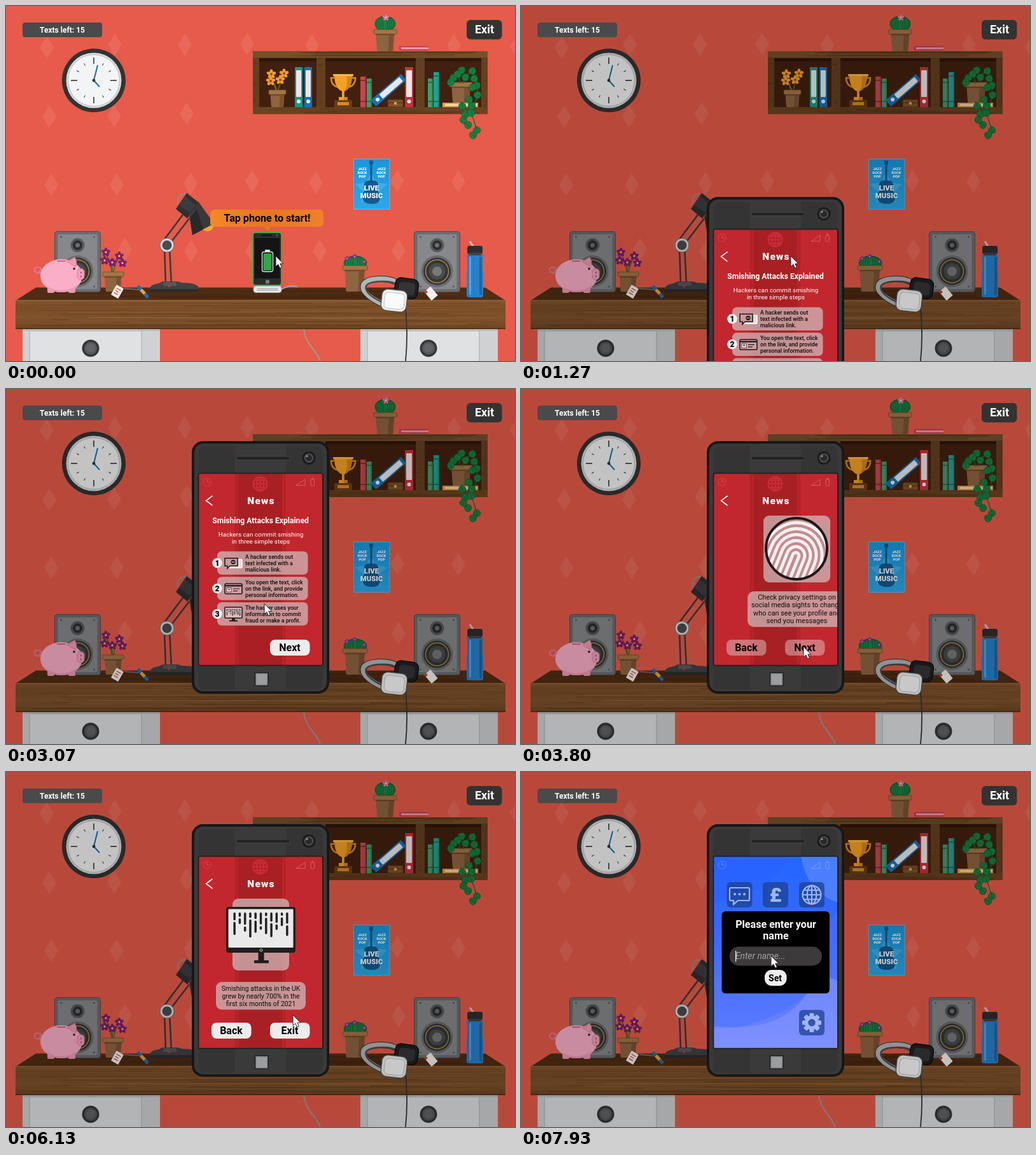
These frames come from a looping animation (800 by 558 pixels, 8000 ms). An HTML page:

```html
<!DOCTYPE html>
<html lang="en">
<head>
<meta charset="utf-8">
<title>Smishing game</title>
<style>
html, body { margin: 0; width: 100%; height: 100%; overflow: hidden; background: #e65b49; }
svg { display: block; width: 100vw; height: 100vh; }
text { font-family: Roboto, Arial, sans-serif; }
</style>
</head>
<body>
<svg id="stage" viewBox="0 0 800 558" preserveAspectRatio="none"></svg>
<script>
const rect = (x, y, w, h, fill, rx = 0, more = '') =>
  `<rect x="${x}" y="${y}" width="${w}" height="${h}" rx="${rx}" fill="${fill}" ${more}/>`;
const circ = (x, y, r, fill, more = '') => `<circle cx="${x}" cy="${y}" r="${r}" fill="${fill}" ${more}/>`;
const oval = (x, y, a, b, fill, more = '') =>
  `<ellipse cx="${x}" cy="${y}" rx="${a}" ry="${b}" fill="${fill}" ${more}/>`;
const path = (d, fill, more = '') => `<path d="${d}" fill="${fill}" ${more}/>`;
const line = (d, color, w = 1, more = '') =>
  `<path d="${d}" fill="none" stroke="${color}" stroke-width="${w}" ${more}/>`;
const group = (more, ...parts) => `<g ${more}>${parts.join('')}</g>`;
const edge = (c, w = 1) => `stroke="${c}" stroke-width="${w}"`;
const text = (x, y, size, str, fill = '#000', weight = 700, anchor = 'middle', more = '') =>
  `<text x="${x}" y="${y}" font-size="${size}" font-weight="${weight}" fill="${fill}" text-anchor="${anchor}" ${more}>${str}</text>`;
const lines = (x, y, step, size, rows, ...rest) =>
  rows.map((s, i) => text(x, y + i * step, size, s, ...rest)).join('');
const each = (list, f) => list.map(f).join('');
const times = (n, f) => each([...Array(n).keys()], f);

let seed = 7;
const rnd = () => (seed = seed * 16807 % 2147483647) / 2147483647;

function grain(x, y, w, h, n, color) {
  return times(n, () => {
    const len = w * (0.2 + rnd() * 0.6), px = x + rnd() * (w - len), py = y + rnd() * h;
    return line(`M${px} ${py}q${len / 4} ${rnd() * 2 - 1} ${len / 2} 0t${len / 2} 0`, color, 0.6 + rnd(), 'opacity=".45"');
  });
}

function pot(x, y, w, h) {
  const i = w * 0.09, b = w * 0.14;
  return path(`M${x + i} ${y + 5}h${w - 2 * i}l${i - b} ${h - 7}q0 2 -3 2h${6 - w + 2 * b}q-3 0 -3 -2z`, '#8f6440') +
    path(`M${x + w * 0.66} ${y + 6}h${w * 0.22}l-2 ${h - 6}h${-w * 0.2}z`, '#7a5232') +
    rect(x, y, w, 7, '#a37549', 1, edge('#70492a', 0.8)) + rect(x + i, y + 7, w - 2 * i, 2, '#704a2b');
}

function flower(x, y, r, color, core) {
  return times(5, i => group(`transform="translate(${x} ${y}) rotate(${i * 72})"`,
    path(`M0 0Q${r} ${-r * 0.7} ${r * 0.3} ${-r * 1.7}H${-r * 0.3}Q${-r} ${-r * 0.7} 0 0z`, color, edge('#0003', 0.5)))) +
    circ(x, y, r * 0.42, core);
}

const binder = (x, y, w, h, color) =>
  rect(x, y, w, h, color, 1) + rect(x + 2, y + 5, w - 4, h - 21, '#e8e8e8', 1) + circ(x + w / 2, y + h - 9, 3, '#eee');
const book = (x, y, w, h, color, dark) => rect(x, y, w, h, color, 1) + rect(x, y + 5, w, 2, dark) +
  rect(x, y + h - 10, w, 2, dark) + rect(x + w - 2, y, 2, h, dark, 0, 'opacity=".6"');

function cactus(x, y, a, b) {
  return oval(x, y, a, b, '#178344', edge('#0b5a2c')) +
    times(5, i => oval(x, y, a * i / 4.6, b, 'none', edge('#0c6130', 1)));
}

function wall() {
  const spots = [64,65, 171,61, 281,61, 379,60, 481,62, 704,62, 803,64, 68,174, 170,173, 284,169, 71,281,
    174,281, 290,279, 387,276, 487,278, 615,275, 711,276, 187,382, 291,385, 387,385, 493,385, 617,384];
  let out = rect(0, 0, 800, 558, '#e65b49');
  for (let i = 0; i < spots.length; i += 2)
    out += path(`M${spots[i]} ${spots[i + 1] - 18}l11 18l-11 18l-11 -18z`, '#fff', 'opacity=".09"');
  return out;
}

function clock() {
  return circ(138, 117, 50, '#333') + circ(138, 117, 43.5, '#d6d8da') + circ(138, 117, 40.5, '#f3f4f5', edge('#bcbec0')) +
    times(12, i => line(`M138 ${i % 3 ? 90 : 91}V${i % 3 ? 86 : 81}`, '#333', i % 3 ? 1 : 1.6, `transform="rotate(${i * 30} 138 117)"`)) +
    line('M138 117L144 93', '#1273b5', 2) + line('M138 117L147 127', '#1273b5', 2) + circ(138, 117, 2.4, '#333');
}

function trophy() {
  return line('M516 113H511Q511 126 524 128M544 113H549Q549 126 536 128', '#d98a1b', 2.6) +
    path('M516 108H544Q544 129 532 134V143H537V149H523V143H528V134Q516 129 516 108z', '#f3a024') +
    path('M535 108H544Q544 129 532 134V143H537V149H531V134Q538 128 535 108z', '#d58415') +
    rect(514, 107, 32, 3.5, '#f9b545', 1) + rect(516, 148, 28, 11, '#6b3c16') + rect(521, 151, 18, 5, '#d58b1f');
}

function ivy() {
  const at = [716,101, 733,102, 703,113, 722,112, 736,114, 699,120, 740,125, 710,107, 733,128, 741,140, 728,147,
    717,157, 732,157, 722,170, 731,168, 726,187, 719,179, 740,195, 734,203];
  let out = rect(686, 152, 56, 7, '#e0a04a') + rect(690, 154, 50, 3, '#f5dca8') + pot(697, 120, 36, 32) +
    line('M714 122Q710 106 716 100M718 122Q722 104 734 104Q742 120 740 140T730 158T722 180M730 165Q736 180 740 196', '#1f6b36', 1.4);
  for (let i = 0; i < at.length; i += 2)
    out += group(`transform="translate(${at[i]} ${at[i + 1]}) rotate(${i * 47 % 140 - 70}) scale(.9)"`,
      path('M0 -7Q8 -3 6 3Q3 7 0 6Q-3 7 -6 3Q-8 -3 0 -7z', '#14803f', edge('#0a5a2b', 0.7)), line('M0 -5V5', '#0a5a2b', 0.6));
  return out;
}

function shelf() {
  return rect(388, 71, 369, 99, '#64401f') + rect(388, 71, 369, 10, '#77502b') + rect(388, 159, 369, 11, '#6b4522') +
    grain(389, 72, 366, 8, 10, '#4f3016') + grain(389, 160, 366, 9, 10, '#4a2c14') +
    each([[398, 90], [502, 142], [658, 89]], ([x, w]) => rect(x, 82, w, 77, '#42200f') + rect(x, 82, w, 5, '#2f1509')) +
    each([388, 488, 644, 747], x => grain(x, 90, 10, 65, 5, '#452a13')) +
    line('M425 134Q420 122 417 107M427 134Q431 120 438 107M426 134L422 122', '#6d6a25', 1.4) +
    each([[417, 107], [437, 106], [431, 116], [416, 118]], ([x, y]) => flower(x, y, 4.4, '#f6a02c', '#8a4a12')) +
    pot(413, 132, 27, 27) + binder(454, 96, 12, 63, '#139a8c') + binder(469, 96, 12, 63, '#1372b9') + trophy() +
    book(557, 111, 9, 48, '#c4474d', '#8e2c35') + book(567, 114, 8, 45, '#3f9d70', '#25724d') +
    group('transform="rotate(49 601 133)"', binder(594, 101, 13, 63, '#1372b9')) +
    rect(600, 147, 24, 12, '#7d5226', 2, edge('#4e3014')) + line('M600 152H624', '#4e3014') + rect(610, 151, 4, 4, '#d6a84a') +
    binder(627, 96, 13, 63, '#c9303c') + book(663, 114, 8, 45, '#3f9d70', '#25724d') +
    book(672, 104, 9, 55, '#24a091', '#147367') + ivy() +
    cactus(596, 28, 16, 12) + flower(597, 18, 3.2, '#ee7f9d', '#f9c2d0') + pot(578, 37, 36, 34) +
    rect(618, 63, 46, 7, '#c5415a', 1) + rect(621, 65, 43, 3, '#ef9aa6');
}

function poster() {
  const star = times(10, i => {
    const r = i % 2 ? 13 : 27, a = i * Math.PI / 5 - 1.57;
    return (i ? 'L' : 'M') + (574 + r * Math.cos(a)) + ' ' + (288 + r * Math.sin(a));
  });
  return rect(546.5, 240.5, 56.5, 79, 'url(#blue)', 0, edge('#54bdea')) + path(star + 'z', '#5cbdf0', 'opacity=".5"') +
    path('M571 243h6v5l-1.5 2v24q10 0 10 9q-3 6 1 11q6 17 -12 17t-13-17q4-5 1-11q0-9 10-9v-24l-1.5-2z', '#15598c') +
    lines(560, 258, 6, 5.6, ['JAZZ', 'ROCK', 'POP'], '#fff', 900) + lines(590, 258, 6, 5.6, ['JAZZ', 'ROCK', 'POP'], '#fff', 900) +
    lines(574.5, 290, 12, 11.3, ['LIVE', 'MUSIC'], '#fff', 900);
}

function desk() {
  const box = x => rect(x, 508, 216, 50, '#cfd1d2') + rect(x, 508, 216, 3, '#bbbdbf') + rect(x + 11, 512, 176, 46, '#dfe1e2') +
    line(`M${x + 11} 510V558M${x + 187} 510V558`, '#b9bbbd', 1.5) +
    circ(x + 107, 538, 13.5, '#363638') + circ(x + 107, 538, 10, '#57585b') + circ(x + 107, 537.5, 7, '#636467');
  return box(26) + box(557) + line('M468 508Q470 524 480 536T494 558', '#9a9a9c', 2) +
    path('M47 442.5H753L785 463H15z', '#502d14') + grain(40, 446, 710, 14, 14, '#3f210d') +
    rect(15, 462, 770, 46, 'url(#wood)') + grain(15, 465, 770, 40, 26, '#5c3819') + grain(15, 465, 770, 40, 14, '#9b6b40') +
    rect(15, 462, 770, 1.5, '#93653b') + rect(15, 506, 770, 2, '#56351a');
}

const speaker = x => rect(x, 354.5, 72, 95, '#6c6d70', 4, edge('#4c4d4f')) + rect(x + 5, 359, 62, 86, '#87888b', 3) +
  each([[10, 363], [62, 363], [10, 441], [62, 441]], ([a, b]) => circ(x + a, b, 1.3, '#4a4b4d')) +
  circ(x + 36, 376, 11, '#58595b') + circ(x + 36, 376, 7.5, '#2c2c2e') + circ(x + 36, 376, 3.5, '#6d6e70') +
  circ(x + 36, 417, 25, '#6a6b6d') + circ(x + 36, 417, 21.5, '#353537') + circ(x + 36, 417, 18, 'none', edge('#a68a43', 1.5)) +
  circ(x + 36, 417, 13, '#4a4b4d') + circ(x + 36, 417, 7.5, '#77787b');

function pig() {
  return line('M57 419q-12 2 -12 -4t7 -4t0 7', '#e2789a', 2.2) +
    each([65, 98], x => rect(x, 436, 11, 15, '#ee97b2', 2)) + rect(76, 438, 9, 11, '#dd819e', 2) +
    oval(87, 424, 33, 26, '#fbaec8') + path('M60 438Q86 456 114 438Q104 450 88 450Q70 450 60 438z', '#ee97b3') +
    path('M96 402l12-7q5 8 1 15z', '#f29bb6', edge('#dd7f9c')) +
    rect(112, 413, 11, 17, '#f4a0ba', 5, edge('#da7e9a')) + circ(107, 413, 1.8, '#222') +
    oval(118, 419, 1, 1.6, '#a84f66') + oval(118, 425, 1, 1.6, '#a84f66') + rect(80, 400, 14, 2, '#c46a86', 1);
}

function lamp() {
  return line('M249 380L251 438M257 380L260 438M248 368L284 320M258 373L288 334', '#3b3b3d', 2.6) +
    line('M285 296Q268 292 270 312', '#8f9092', 2) + circ(317, 345, 9, '#f8a82c') +
    path('M284 294L303 309L285 334L267 319z', '#2f2f31') + path('M281 299L298 313L289 325L272 313z', '#3d3d40') +
    path('M302 307L327 342L293 360L288 331z', '#39393b') + path('M300 320L310 351L293 360L290 332z', '#29292b') +
    path('M327 343Q326 353 316 354L309 352z', '#f8a82c') +
    path('M226 449V444Q228 437 240 436L246 433H270L277 435Q301 435 303 443V449z', '#414143') +
    rect(226, 445, 77, 4.5, '#2c2c2e', 1) + rect(247, 434, 21, 6, '#58595b', 2) + circ(256, 440, 2, '#c33') +
    circ(253, 376, 11, '#d9dadb', edge('#6c6d70')) + circ(253, 376, 7.5, '#4a4b4e');
}

function dock() {
  return line('M433 445Q445 438 458 441', '#9fa0a2', 2.4) + rect(389, 440, 44, 10.5, '#e9eaeb', 4, edge('#a5a6a8')) +
    rect(394, 443, 34, 5, '#c3c5c7', 2) +
    rect(388, 356, 45, 83, '#2b2b2d', 4, 'id="glow" stroke="#35b04a" stroke-width="2"') +
    rect(391, 365, 39, 63, '#141416') + rect(402, 359.5, 16, 2, '#111', 1) + circ(426, 360.5, 1.7, '#555') + rect(408, 430.5, 6, 6, '#777', 1) +
    rect(402.5, 386.5, 17, 31, 'none', 3, edge('#d9e8db', 1.3)) + rect(407, 383, 8, 3, '#d9e8db', 1) +
    rect(404.5, 389, 13, 26.5, '#2fa847', 1.5);
}

function props() {
  const tag = (x, y, a, c) => group(`transform="translate(${x} ${y}) rotate(${a})"`, rect(-6.5, -9, 13, 18, '#f3f1ee', 1),
    c ? rect(-4, -5, 8, 1.5, c) + rect(-4, -1, 6, 1.5, c) + rect(-4, 3, 7, 1.5, c) : rect(-6.5, -9, 4, 4, '#c33'));
  const cap = '#2e2e30', band = 'M593 469Q557 452 562 438Q566 430 586 429Q606 428 616 436';
  return speaker(76.5) + speaker(641.5) + pig() +
    line('M166 420Q166 404 157 390M169 420Q171 404 178 394M168 420L166 402', '#3c6b2e', 1.5) +
    each([[157, 387], [178, 393], [167, 403], [183, 404], [155, 400]], ([x, y]) => flower(x, y, 4, '#7d1c79', '#f0c34a')) +
    pot(152, 418, 33, 31) + tag(175, 449, 30, '#d0574c') +
    line('M186 444L209 446', '#6a6a6c', 2) + line('M207 440L223 458', '#1c6fb8', 5) + line('M212 446L218 452', '#f2a32b', 5) + lamp() +
    cactus(549, 404, 18, 11) + each([[536, 397], [548, 394], [563, 402]], ([x, y]) => flower(x, y, 2.3, '#8d3a9b', '#e7a9e6')) + pot(529, 408, 39, 41) +
    line('M628 474Q632 520 628 558', '#333', 1.8) +
    line(band, '#2f2f31', 10) + line(band, '#b4b5b7', 8) + line('M592 466Q562 452 566 440Q569 434 587 433Q604 432 614 437', '#4a4a4c', 2.6) +
    group('transform="rotate(8 629 443)"', rect(611, 428, 37, 31, '#1f1f21', 9, edge('#000')), rect(617, 434, 26, 20, '#343437', 6)) +
    group('transform="rotate(6 610 463)"', rect(590, 446, 40, 34, '#eceded', 9, edge('#4f4f51', 1.3)), rect(595, 451, 31, 25, '#fafafa', 6, edge('#c4c5c7'))) +
    tag(668, 452, -40) + line('M729 370L735 379', '#c9cbcd', 3) +
    path('M724 391H750Q748 410 750 420V455Q750 458 746 458H728Q724 458 724 455V420Q726 410 724 391z', '#2780ca') +
    rect(728, 394, 3, 60, '#58a4de', 2) + rect(744, 394, 4, 61, '#1c66a8', 2) + rect(725, 377, 24, 13, cap, 3) + rect(727, 388, 20, 4, '#444');
}

const hud = rect(26, 26, 125, 23, '#4a4a4a', 4) + text(88.5, 42, 12, 'Texts left: 15', '#fff') +
  rect(724, 22, 55.5, 30.5, '#333', 6) + text(752, 43.2, 18, 'Exit', '#fff');

const bubble = group('id="bubble"', path('M404 346h14l-7 7z', '#e87a20'), rect(321, 320, 178, 27, 'url(#amber)', 6), text(410.5, 338.7, 16.1, 'Tap phone to start!'));

const globe = (x, y, r, c, w) => circ(x, y, r, 'none', edge(c, w)) + oval(x, y, r / 2, r, 'none', edge(c, w)) +
  line(`M${x} ${y - r}v${2 * r}M${x - r} ${y}h${2 * r}M${x - r * .85} ${y - r / 2}h${r * 1.7}M${x - r * .85} ${y + r / 2}h${r * 1.7}`, c, w);
const status = c => circ(316, 146, 6, 'none', edge(c, 0.9) + ' stroke-dasharray="2 1"') + line('M316 142V146H319', c, 0.8) +
  line('M456 151.5L470 142V151.5z', c, 0.9) + rect(479, 142, 5.5, 10, 'none', 1, edge(c, 0.9)) + rect(480.5, 140, 2.5, 1.5, c);

const glass = (x, y, w, h, rx = 8) => rect(x, y, w, h, '#d4d4d4', rx, 'opacity=".63"');
const screenBars = (x, y, w, h, n) => times(n, i => {
  const px = x + w * (i + .5) / n, len = h * (.3 + .7 * Math.abs(Math.sin(i * 2.3 + 1))), cut = h * (.25 + .2 * Math.sin(i * 4));
  return line(`M${px} ${y}v${cut}M${px} ${y + cut + w / n * .7}V${y + Math.max(len, cut + w / n)}`, '#222', w / n * .42, 'stroke-linecap="round"');
});

function pageSteps() {
  const steps = [['A hacker sends out', 'text infected with a', 'malicious link.'], ['You open the text, click', 'on the link, and provide', 'personal information.'],
    ['The hacker uses your', 'information to commit', 'fraud or make a profit.']];
  const ink = edge('#1d1a1b', 1.6);
  const icons = [rect(350, 268, 21, 13, '#e9dcdc', 1, edge('#fff', 1.4)) + path('M344 266h20v12h-12l-4 4v-4h-4z', '#c99a9c', ink) + circ(357, 272, 3.6, '#222') + circ(355.8, 272, .9, '#ddd') + circ(358.3, 272, .9, '#ddd'),
    rect(344, 306, 27, 16, '#cf9fa1', 2, ink) + rect(344, 308, 27, 2.5, '#222') + rect(347, 312.5, 7, 6.5, '#f1e4e4', 0, edge('#222', .7)) + circ(350.5, 315, 1.5, '#b33') + line('M357 314h10M357 317.5h7', '#222', 1.2),
    rect(344, 343, 27, 17, '#dcbcbd', 1, ink) + screenBars(346, 346, 23, 10, 8) + rect(355, 360, 5, 4, '#222') + rect(351, 363.5, 13, 2, '#222')];
  return text(400, 211, 12.1, 'Smishing Attacks Explained', '#fff') +
    lines(400.5, 231.5, 11, 9.9, ['Hackers can commit smishing', 'in three simple steps'], '#fff', 400) +
    each(steps, (rows, i) => {
      const y = 255.3 + i * 40;
      return glass(332, y, 142.5, 36.5, 7) + circ(332, y + 18.2, 7.8, '#efefef') + text(332, y + 22.4, 12, i + 1, '#000', 900) +
        icons[i] + lines(376, y + 11.3, 10.1, 8.75, rows, '#0c0c0c', 500, 'start');
    });
}

function pagePrint() {
  const ridges = times(9, i => {
    const r = 5 + i * 9;
    return line(`M${403 - r} 330V262A${r} ${r * 1.05} 0 0 1 ${403 + r} 262V330`, '#f4f0f0', 5);
  });
  return glass(348, 199, 105, 105, 9) + circ(400, 251, 48, '#c48b8e') +
    group('clip-path="url(#round)"', group('transform="rotate(22 400 251)"', ridges)) + circ(400, 251, 48, 'none', edge('#1c1819', 4)) +
    glass(323, 318, 155, 56, 10) + lines(400.5, 330.6, 12.5, 10.8, ['Check privacy settings on', 'social media sights to change', 'who can see your profile and', 'send you messages'], '#0c0c0c', 400);
}

function pageScreen() {
  return glass(356, 199, 89, 113, 9) + rect(396.5, 282, 9, 16, '#1c1c1c') + rect(390, 296, 23, 4.5, '#1c1c1c', 1) +
    rect(346, 212, 109, 72, '#1f1f1f', 4) + rect(349.5, 215.5, 102, 60.5, '#e9e9e9', 1) + screenBars(355, 222.5, 91, 36, 11) +
    circ(401, 280, 2, '#1f1f1f', edge('#ccc', 1)) + glass(330, 330, 141, 43.5, 9) +
    lines(400.5, 343.8, 12.2, 10.4, ['Smishing attacks in the UK', 'grew by nearly 700% in the', 'first six months of 2021'], '#0c0c0c', 400);
}

const button = (id, x, label) => group(`id="${id}"`, rect(x, 394, 62.5, 25, '#ececec', 8, `id="${id}Plate"`),
  text(x + 31, 412.3, 16, label, '#000', 700, 'middle', `id="${id}Label"`));

const news = group('id="news"', rect(303, 133, 195, 302, '#c2272d'), rect(360, 133, 79, 302, '#a92024'),
  rect(361.5, 133, 4, 302, '#b8242a'), rect(434, 133, 4, 302, '#b8242a'), status('#d2666b'), globe(399.5, 149, 11, '#cb2c37', 2),
  line('M324.5 168L314.5 175.5L324.5 183', '#fff', 1.6), text(401, 181, 15.5, 'News', '#fff', 900, 'middle', 'letter-spacing="1.2"'),
  group('id="page0"', pageSteps()), group('id="page1"', pagePrint()), group('id="page2"', pageScreen()), button('back', 323, 'Back'), button('next', 415, 'Next'));

function home() {
  const tile = (x, y) => rect(x, y, 40, 40, '#1d3f8e', 6, 'opacity=".72"'), c = '#9fb6ef';
  const teeth = times(8, i => rect(453.5, 379, 7, 8, c, 1.5, `transform="rotate(${i * 45} 457 394)"`));
  return group('id="home"', rect(303, 133, 195, 302, 'url(#sky)'),
    path('M303 133H420Q400 190 303 205z', '#2a62ff', 'opacity=".6"'), path('M303 340Q400 330 498 220V300Q420 400 303 405z', '#4a70ff', 'opacity=".5"'),
    path('M303 400Q400 410 440 360T498 330V435H303z', '#8b98ff', 'opacity=".55"'), path('M498 133H440Q450 190 498 205z', '#7f9dff', 'opacity=".4"'), status('#7f9cf5'),
    tile(323.5, 173), tile(380, 173), tile(437, 173), tile(437, 374),
    line('M330 182H357Q359 182 359 184V200Q359 202 357 202H341L334 208V202H330Q328 202 328 200V184Q328 182 330 182z', c, 2.2),
    each([336, 343.5, 351], x => circ(x, 192, 2, c)), text(400, 204, 32, '£', c, 900), globe(457, 193, 14.5, c, 2.2),
    teeth, circ(457, 394, 8.5, 'none', edge(c, 5.5)));
}

const dialog = group('id="dialog"', rect(315.5, 219, 169.5, 129, '#000', 6), lines(400.5, 244.5, 18.5, 16.1, ['Please enter your', 'name'], '#fff'),
  rect(327.5, 274.5, 145.5, 30, '#3d3a3b', 15), text(337, 294, 13.8, 'Enter name...', '#a3a1a2', 400, 'start', 'font-style="italic"'),
  rect(337, 281, 1.2, 17, '#fff', 0, 'id="caret"'), rect(383, 311, 34.5, 25, '#eee', 11), text(399.5, 328.5, 14, 'Set'));

const phone = group('id="phone"', rect(293.5, 83.5, 213, 394, '#1d1d1e', 16, edge('#161616', 3)), rect(296, 86, 208, 389, '#39393a', 14),
  rect(303, 90, 194, 382, '#343435', 8), rect(360, 87, 80, 387, '#3a3a3b'), rect(362, 106, 84, 5.5, '#232324', 2.5, edge('#4c4c4e', .8)),
  circ(476, 108.5, 10.5, '#1b1b1c'), circ(476, 108.5, 7.5, '#4a4a4c'), circ(476, 108.5, 5, '#2a2a2c'), circ(473, 105.5, 1.5, '#999'),
  rect(391.5, 446, 20.5, 20.5, '#8d8e90', 1, edge('#1e1e1f', 1.5)), rect(394, 448.5, 15.5, 15.5, '#9c9d9f'),
  group('clip-path="url(#glass)"', news, home(), dialog), rect(302.5, 132.5, 195.5, 302, 'none', 2, edge('#1b1b1c', 1.6)));

const stops = list => each(list, ([o, c]) => `<stop offset="${o}" stop-color="${c}"/>`);
const defs = `<defs><linearGradient id="wood" x2="0" y2="1">${stops([[0, '#83562f'], [.3, '#7a4d27'], [.6, '#80532c'], [1, '#6d4522']])}</linearGradient>
<linearGradient id="sky" x2="0" y2="1">${stops([[0, '#2467ff'], [.45, '#3a69ff'], [1, '#7288ff']])}</linearGradient>
<linearGradient id="amber">${stops([[0, '#f28a24'], [.5, '#e87420'], [1, '#f0822a']])}</linearGradient>
<linearGradient id="blue" x2="0" y2="1">${stops([[0, '#1996db'], [1, '#2ba8e8']])}</linearGradient>
<clipPath id="glass">${rect(303, 133, 194.5, 301.5, '#000', 2)}</clipPath><clipPath id="round">${circ(400, 251, 48, '#000')}</clipPath></defs>`;

document.getElementById('stage').innerHTML = defs + wall() + clock() + shelf() + poster() + desk() + props() + dock() + bubble +
  rect(0, 0, 800, 558, '#000', 0, 'id="dim"') + hud + phone +
  group('id="cursor"', path('M0 0V16.5L3.8 13L6.5 19L9.4 17.7L6.8 12H11.8z', '#fff', edge('#222', 1) + ' stroke-linejoin="round"'));

const LOOP = 8000, RISE = 1004, SLIDE = 600, TURN1 = 3520, TURN2 = 4220, LEAVE = 6500;
const trail = [[0, 424, 393], [1450, 424, 393], [1840, 334, 213], [2650, 334, 213], [2950, 385, 300], [3250, 444, 405], [4260, 444, 405],
  [4780, 362, 230], [4950, 362, 230], [5200, 368, 184], [5450, 380, 171], [6100, 451, 382], [6180, 451, 382], [6400, 447, 404], [7150, 447, 404], [7700, 393, 289]];
const $ = id => document.getElementById(id);
const set = (id, name, value) => $(id).setAttribute(name, value);
const ramp = (t, from, dur) => Math.min(1, Math.max(0, (t - from) / dur));
const easeOut = p => 1 - (1 - p) ** 3;
const smooth = p => p * p * (3 - 2 * p);
const popOut = p => 1 + 2.2 * (p - 1) ** 3 + 1.2 * (p - 1) ** 2;

function pointer(t) {
  let i = trail.length - 1;
  while (trail[i][0] > t) i--;
  const a = trail[i], b = trail[i + 1] || a, p = smooth(ramp(t, a[0], b[0] - a[0] || 1));
  return [a[1] + (b[1] - a[1]) * p, a[2] + (b[2] - a[2]) * p];
}

function draw(t) {
  const dim = ramp(t, 900, 250);
  set('dim', 'opacity', 0.2 * dim);
  set('bubble', 'opacity', 1 - dim);
  set('glow', 'stroke-width', 2 + 0.5 * Math.sin(t / 150));
  set('phone', 'transform', `translate(0 ${537 * (1 - easeOut(ramp(t, RISE, 1030)))})`);

  const pos = easeOut(ramp(t, TURN1, SLIDE)) + easeOut(ramp(t, TURN2, SLIDE));
  for (let i = 0; i < 3; i++) set('page' + i, 'transform', `translate(${(i - pos) * 220} 0)`);
  const moving = [TURN1, TURN2].some(s => t >= s && t < s + SLIDE);
  set('back', 'opacity', t < TURN1 ? 0 : 1);
  for (const id of ['backPlate', 'nextPlate']) set(id, 'opacity', moving ? 0.4 : 1);
  $('nextLabel').textContent = t < TURN2 ? 'Next' : 'Exit';

  set('home', 'opacity', ramp(t, LEAVE, 200));
  const open = ramp(t, 7050, 350), k = popOut(open);
  set('dialog', 'opacity', Math.min(1, open * 3));
  set('dialog', 'transform', `translate(400 283.5) scale(${Math.max(0, k)}) translate(-400 -283.5)`);
  set('caret', 'opacity', t < 7450 || t >= 7900 ? 1 : 0);
  set('cursor', 'transform', `translate(${pointer(t).join(' ')})`);
}

const start = performance.now();
function tick() {
  draw((performance.now() - start) % LOOP);
  requestAnimationFrame(tick);
}
tick();
</script>
</body>
</html>
```
